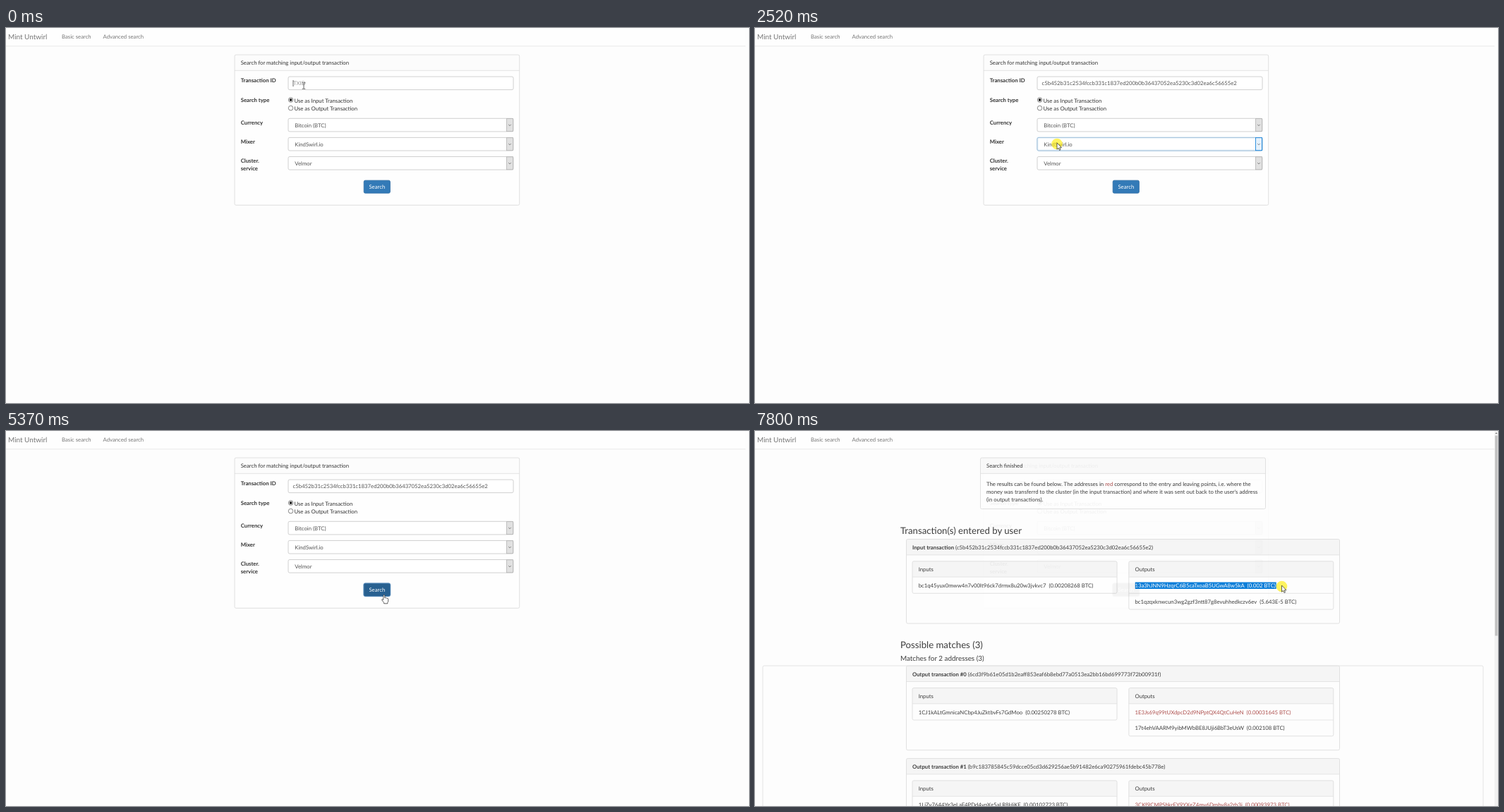
An HTML page that plays this animation: 1053 px wide and 532 px high, repeating every 8 s.

```html
<!DOCTYPE html>
<html lang="en">
<head>
<meta charset="utf-8">
<title>Transaction search</title>
<style>
  html, body { margin: 0; width: 100%; height: 100%; overflow: hidden; background: #fdfdfd; }
  svg { display: block; width: 100vw; height: 100vh; }
  text { font-family: Lato, sans-serif; white-space: pre; text-rendering: geometricPrecision; }
  .option { font-family: "Liberation Serif", "Times New Roman", serif; }
  .glow { fill: none; stroke: #66afe9; filter: drop-shadow(0 0 1.3px rgba(102, 175, 233, .85)); }
</style>
</head>
<body>
<svg id="stage" viewBox="0 0 1053 532"></svg>
<script>
const LOOP = 8000;
const BASE = 7.75;
const RED = '#a94442';
const TXID = 'c5b452b31c2534fccb331c1837ed200b0b36437052ea5230c3d02ea6c56655e2';
const stage = document.getElementById('stage');

function add(parent, tag, attrs = {}, content) {
  const node = document.createElementNS('http://www.w3.org/2000/svg', tag);
  for (const key in attrs) node.setAttribute(key, attrs[key]);
  if (content) node.textContent = content;
  parent.append(node);
  return node;
}
const group = parent => add(parent, 'g');

// y is the middle of the capitals
function label(parent, x, y, content, { size = BASE, fill = '#333', ...rest } = {}) {
  return add(parent, 'text', { x, y: y + size * .36, 'font-size': size, fill, ...rest }, content);
}
function box(parent, x, y, width, height, fill, stroke, rx = 2) {
  return add(parent, 'rect', { x, y, width, height, fill, stroke, rx, 'stroke-width': .8 });
}
function line(parent, x1, x2, y, stroke = '#ddd') {
  return add(parent, 'line', { x1, x2, y1: y, y2: y, stroke, 'stroke-width': .8 });
}
function show(node, on) {
  node.style.display = on ? '' : 'none';
}
function panel(parent, x, y, w, h, headFill) {
  box(parent, x, y, w, h, '#fefefe', 'none');
  box(parent, x, y, w, 22.3, headFill, 'none');
  line(parent, x, x + w, y + 22.3);
  box(parent, x, y, w, h, 'none', '#d9d9d9');
}

// Result page
const results = group(stage);
box(results, 0, 0, 1053, 532, '#fdfdfd', 'none', 0);
panel(results, 319.5, 38, 404, 72.5, '#f9f9f9');
label(results, 328, 49, 'Search finished');
const intro = label(results, 328, 75, 'The results can be found below. The addresses in ');
add(intro, 'tspan', { fill: RED }, 'red');
add(intro, 'tspan', {}, ' correspond to the entry and leaving points, i.e. where the');
label(results, 328, 86, 'money was transferrd to the cluster (in the input transaction) and where it was sent out back to the user\'s address');
label(results, 328, 97, '(in output transactions).');
label(results, 206, 141, 'Transaction(s) entered by user', { size: 13.2 });
label(results, 206, 303.3, 'Possible matches (3)', { size: 13.2 });
label(results, 206, 322, 'Matches for 2 addresses (3)', { size: 9.87 });
box(results, 11, 333, 1021, 230, 'none', '#ddd');

function rows(x, y, title, items, redFirst) {
  panel(results, x, y, 290, 22.7 + 22.8 * items.length, '#f5f5f5');
  label(results, x + 8.7, y + 11.8, title);
  return items.map((item, i) => {
    if (i) line(results, x, x + 290, y + 22.7 + 22.8 * i);
    return label(results, x + 8.7, y + 34.3 + 22.8 * i, item, { fill: redFirst && !i ? RED : '#333' });
  });
}
function transaction(y, name, id, input, outputs) {
  panel(results, 214.5, y, 614, 119.5, '#f5f5f5');
  const head = label(results, 223, y + 11.7, '');
  add(head, 'tspan', { 'font-weight': 700 }, name);
  add(head, 'tspan', {}, ` (${id})`);
  rows(223, y + 31.3, 'Inputs', [input]);
  return rows(529.8, y + 31.3, 'Outputs', outputs, true);
}
const [picked] = transaction(153.5, 'Input transaction', TXID,
  'bc1q45yux0mww4n7v00lt96ck7drmx8u20w3jvkvc7  (0.00208268 BTC)',
  ['13a3hJNN9HzqrC6B5caTxoaB5UGwA8w5kA  (0.002 BTC)',
   'bc1qzqxknwcun3wg2gzf3ntt87g8evuhhedkczv6ev  (5.643E-5 BTC)']);
transaction(333.2, 'Output transaction #0', '6cd3f9b61e05d1b2eaff853eaf6b8ebd77a0513ea2bb16bd699773f72b00931f',
  '1CJ1kALtGmnicaNCbp4JuZktbvFs7GdMoo  (0.00250278 BTC)',
  ['1E3Js69q99tUXdpcD2d9NPptQX4QtCuHeN  (0.00031645 BTC)',
   '17t4ehVAARM9yibMWbBE8JUji6BbT3eUsW  (0.002108 BTC)']);
transaction(464.6, 'Output transaction #1', 'b9c183785845c59dcce05cd3d629256ae5b91482e6ca90275961fdebc45b778e',
  '1LjZv7644Yg3eLaF4PDd4vpXg5aLR8HiKF  (0.00102723 BTC)',
  ['3CKf9CMPShkrFY9YXgZ4mv6Dmbv8a2rh3j  (0.00093973 BTC)',
   '1Hq7bVtWm3RkXz8NfYdP5sJcU2eLg9AoTn  (0.000087 BTC)']);
box(results, 1048, 0, 5, 532, '#f1f1f1', 'none', 0);
box(results, 1048.8, 6.5, 3.6, 284, '#c1c1c1', 'none', 0);
add(results, 'path', { d: 'M1049 4l1.6 -2 1.6 2z', fill: '#777' });

const clip = add(add(stage, 'defs'), 'clipPath', { id: 'marked' });
const clipRect = add(clip, 'rect', { x: 538.5, y: 214.3, height: 9.8 });
const marked = add(results, 'g', { 'clip-path': 'url(#marked)' });
box(marked, 538.5, 214.3, 230, 9.8, '#0078d7', 'none', 0);
marked.append(picked.cloneNode(true));
marked.lastChild.setAttribute('fill', '#fff');
const markLimit = picked.getComputedTextLength() + .8;

// Search form
const form = group(stage);
box(form, 0, 26.5, 1047, 506, '#fdfdfd', 'none', 0);
panel(form, 324, 38, 403.7, 213.3, '#fcfcfc');
label(form, 332.7, 49, 'Search for matching input/output transaction');
const bold = (y, content) => label(form, 332.7, y, content, { 'font-weight': 700 });
bold(74.7, 'Transaction ID');
bold(102, 'Search type');
bold(134, 'Currency');
bold(161.2, 'Mixer');
bold(188.5, 'Cluster.');
bold(199.5, 'service');

function field(y) {
  box(form, 400, y, 319, 18.6, '#fff', '#c4c4c4');
  return box(form, 400, y, 319, 18.6, 'none', '', 2);
}
const inputGlow = field(69);
const hint = label(form, 407, 78.5, 'TXID', { fill: '#999' });
const caret = add(form, 'path', { d: 'M407 74v9', stroke: '#222', 'stroke-width': .7 });
const value = label(form, 406.6, 78.6, TXID, { fill: '#555' });

[[102, 'Use as Input Transaction'], [113.6, 'Use as Output Transaction']].forEach(([cy, content], i) => {
  add(form, 'circle', { cx: 403.6, cy, r: 3.3, fill: '#fff', stroke: '#444', 'stroke-width': .65 });
  if (!i) add(form, 'circle', { cx: 403.6, cy, r: 1.9, fill: '#222' });
  label(form, 408.4, cy + .8, content);
});

function select(y, options) {
  const glow = field(y);
  label(form, 409.3, y + 9.7, options[0], { fill: '#555' });
  const button = box(form, 709.4, y + .3, 9.2, 18, '', '', 0);
  add(form, 'path', { d: `M712.2 ${y + 8.6}l1.8 1.8 1.8 -1.8`, fill: 'none', stroke: '#555', 'stroke-width': .7 });
  return { y, options, glow, button };
}
const selects = [
  select(128.3, ['Bitcoin (BTC)', 'Litecoin (LTC)']),
  select(155.4, ['KindSwirl.io']),
  select(182.5, ['Velmor', 'None'])
];

const searchGlow = box(form, 506.7, 215.7, 38.2, 19.1, 'none', '#8fb4d6', 2.4);
const search = box(form, 507.2, 216.2, 37.2, 18.1, '', '#2e6da4');
label(form, 525.8, 225.6, 'Search', { fill: '#fff', 'text-anchor': 'middle' });

for (const s of selects) {
  const top = s.y + 18.9;
  s.list = group(form);
  box(s.list, 400.2, top, 318, 13.4 * s.options.length + .8, '#fff', '#7a7a7a', 0);
  box(s.list, 400.6, top + .4, 317.2, 13.2, '#0078d7', 'none', 0);
  s.options.forEach((name, i) =>
    label(s.list, 403.8, top + 7 + 13.4 * i, name, { size: 7.7, fill: i ? '#333' : '#fff', class: 'option' }));
}

// Top bar
const bar = group(stage);
box(bar, 0, 0, 1048, 25.5, '#fefefe', 'none', 0);
line(bar, 0, 1048, 25.7, '#e4e4e4');
label(bar, 3, 12.3, 'Mint Untwirl', { size: 9.95, fill: '#777' });
label(bar, 79, 12.4, 'Basic search', { fill: '#777' });
label(bar, 137.5, 12.4, 'Advanced search', { fill: '#777' });

// Pointer
const pointer = group(stage);
const halo = add(pointer, 'circle', { cy: 1.5, r: 7.8, fill: '#ffee00', opacity: .62 });
const outline = { fill: '#fff', stroke: '#222', 'stroke-width': .7, 'stroke-linejoin': 'round' };
const shapes = {
  arrow: add(pointer, 'path', { ...outline, d: 'M0 0V9.2L2.1 7.3 3.5 10.5 5 9.8 3.7 6.8H6.5Z' }),
  beam: add(pointer, 'path', { ...outline, fill: 'none', d: 'M-2.2 -4.3H-.6L0 -3.8 .6 -4.3H2.2M0 -3.8V3.8M-2.2 4.3H-.6L0 3.8 .6 4.3H2.2' }),
  hand: add(pointer, 'path', { ...outline, d: 'M-1 1Q0 -.6 1 1V4.8Q2 3.9 2.7 5Q3.8 4.4 4.3 5.5Q5.8 5 5.9 6.6V9Q5.8 10.6 5 11.2V12.8H-.2V11.6L-3.2 7.6Q-3.4 6 -1 7.4Z' })
};

// Redraw bursts: first step, last step, number of steps
const bursts = [
  [80, 160, 2], [540, 740, 3], [890, 890, 1], [1060, 1590, 8], [1990, 2600, 9],
  [2910, 3220, 5], [3370, 3520, 3], [4210, 4290, 2], [4440, 5060, 9], [5210, 5370, 3],
  [5690, 5910, 4], [6310, 6460, 3], [6860, 7080, 4], [7250, 7800, 8]
];
// Pointer path: time, x, y
const path = [
  [0, 422, 82], [440, 422, 82], [740, 376, 129], [890, 415, 99], [984, 415, 99], [1435, 423.4, 139.3],
  [1910, 423.4, 139.3], [2140, 425, 151], [2219, 425, 151], [2448, 428, 163], [2830, 428, 163],
  [2985, 430, 179], [3065, 430, 179], [3220, 433.8, 184.8], [4360, 433.8, 184.8], [4830, 545, 238],
  [5060, 535.8, 232], [5689, 535.8, 232], [5690, 250.5, 297], [6230, 250.5, 297], [6460, 209, 134],
  [6785, 209, 134], [6860, 201, 141], [7080, 540, 219], [7250, 540, 218], [7500, 640, 211], [7800, 746.5, 219]
];
const clicks = [[1430, 1580], [2130, 2210], [2440, 2590], [2980, 3060], [3360, 3510], [4200, 4280], [7240, LOOP]];
const lists = [[1500, 2130], [2520, 2980], [3500, 4200]];
const focuses = [[80, 540], [640, 2440], [2440, 3430], [3430, 5210]];

const within = (t, [from, to]) => t >= from && t < to;

function lastStep(t) {
  let q = 0;
  for (const [from, to, n] of bursts) {
    if (t < from) break;
    const gap = (to - from) / (n - 1 || 1) || 1;
    q = from + gap * Math.min(n - 1, Math.floor((t - from) / gap + 1e-6));
  }
  return q;
}
function position(t) {
  const next = path.findIndex(p => p[0] > t);
  if (next < 0) return path[path.length - 1].slice(1);
  const [t0, x0, y0] = path[next - 1], [t1, x1, y1] = path[next];
  const k = (t - t0) / (t1 - t0);
  return [x0 + (x1 - x0) * k, y0 + (y1 - y0) * k];
}
function pointerShape(t, x, overButton) {
  if (t < 540) return 'beam';
  if (t < 5690) return overButton ? 'hand' : 'arrow';
  return within(t, [6850, 7070]) || x > 742 ? 'arrow' : 'beam';
}

function draw(time) {
  const t = lastStep(time);
  const [x, y] = position(t);

  [inputGlow, ...selects.map(s => s.glow)].forEach((glow, i) => {
    const on = within(t, focuses[i]);
    glow.setAttribute('class', 'glow');
    glow.style.opacity = on ? Math.min(1, (t - focuses[i][0] + 75) / 150) : 0;
  });
  show(hint, t < 540);
  show(caret, t < 540);
  show(value, t >= 540);

  selects.forEach((s, i) => {
    const open = within(t, lists[i]);
    const covered = i && within(t, lists[i - 1]);
    const over = x > 400 && x < 719 && y > s.y && y < s.y + 18.6;
    const hot = open || over && !covered;
    show(s.list, open);
    s.button.setAttribute('fill', hot ? '#e5f1fb' : '#e1e1e1');
    s.button.setAttribute('stroke', hot ? '#0078d7' : '#b5b5b5');
  });

  const overButton = x > 507 && x < 544.5 && y > 216 && y < 234.5;
  search.setAttribute('fill', overButton || t >= 5210 ? '#286090' : '#337ab7');
  show(searchGlow, t >= 5210);

  // The form fades away but leaves a faint trace
  const fade = t < 5690 ? 0 : Math.min(1, ((t - 5690) / 220 * 3 + 1) / 4);
  show(results, fade > 0);
  form.style.opacity = 1 - .95 * fade;
  form.style.filter = fade === 1 ? 'grayscale(1)' : 'none';

  const width = t < 7250 ? 0 : Math.max(0, Math.min(markLimit, x - 538.5));
  clipRect.setAttribute('width', width);

  pointer.setAttribute('transform', `translate(${x} ${y})`);
  show(halo, clicks.some(c => within(t, c)));
  const shape = pointerShape(t, x, overButton);
  for (const name in shapes) show(shapes[name], name === shape);
}

const start = performance.now();
function tick() {
  draw((performance.now() - start) % LOOP);
  requestAnimationFrame(tick);
}
tick();
</script>
</body>
</html>
```
